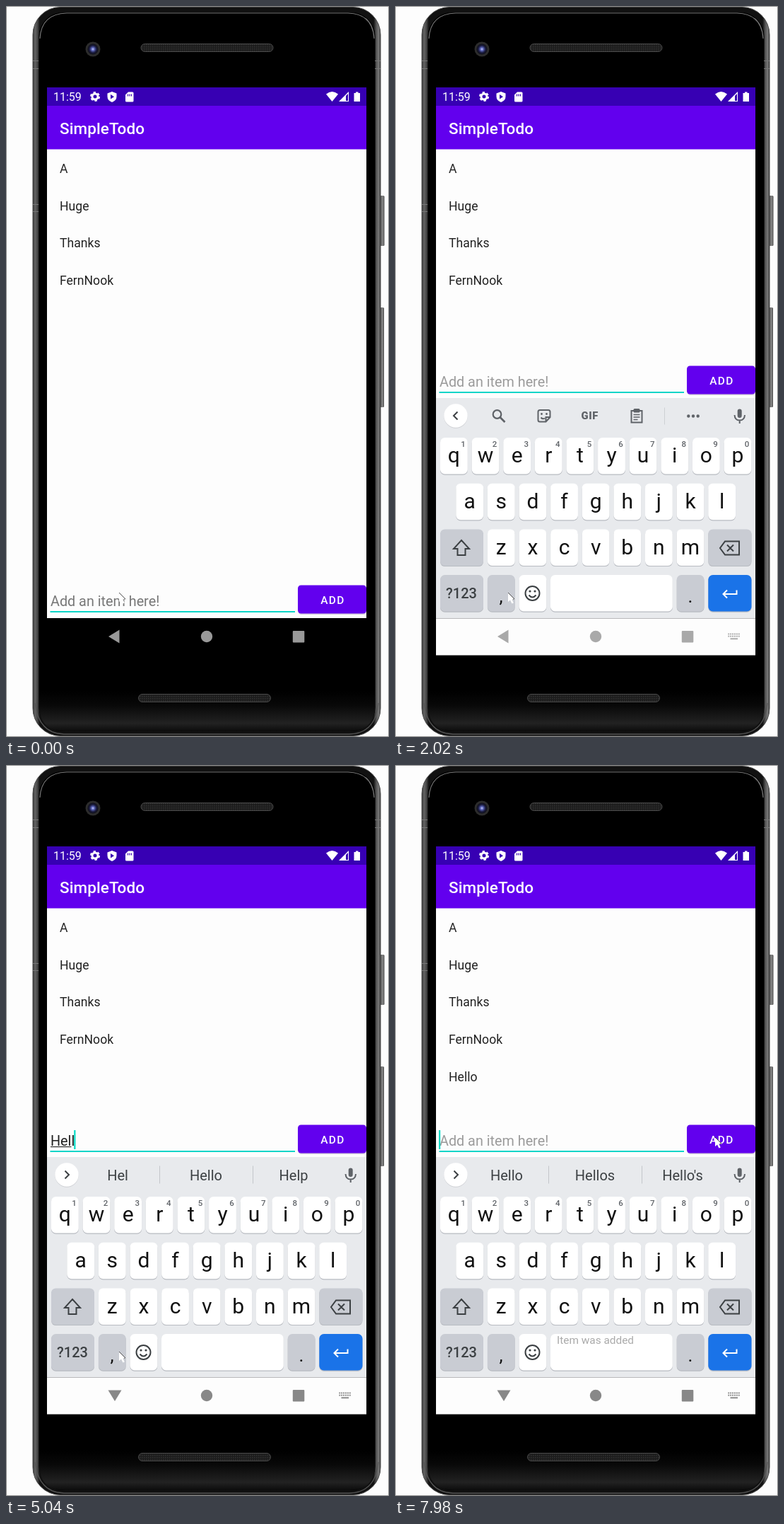
An HTML page that plays this animation: 542 by 1033 pixels, repeating every 8000 ms.

```html
<!DOCTYPE html>
<html lang="en">
<head>
<meta charset="utf-8">
<title>Todo list</title>
<style>
  html, body { margin: 0; width: 100%; height: 100%; overflow: hidden; background: #fdfdfd; }
  svg { display: block; position: absolute; left: 0; top: 0; }
  text { font-family: Roboto, "Open Sans", sans-serif; white-space: pre; }
</style>
</head>
<body>
<svg id="stage" width="542" height="1033" viewBox="0 0 542 1033">
  <defs>
    <linearGradient id="metal">
      <stop offset="0" stop-color="#2a2a2a"/><stop offset=".006" stop-color="#666"/>
      <stop offset=".013" stop-color="#484848"/><stop offset=".02" stop-color="#111"/>
      <stop offset=".98" stop-color="#111"/><stop offset=".988" stop-color="#555"/>
      <stop offset=".995" stop-color="#777"/><stop offset="1" stop-color="#333"/>
    </linearGradient>
    <linearGradient id="side">
      <stop offset="0" stop-color="#444"/><stop offset=".6" stop-color="#8a8a8a"/>
      <stop offset="1" stop-color="#4a4a4a"/>
    </linearGradient>
    <linearGradient id="chin" x2="0" y2="1">
      <stop offset="0" stop-color="#000"/><stop offset=".35" stop-color="#080808"/>
      <stop offset=".8" stop-color="#222"/><stop offset="1" stop-color="#0c0c0c"/>
    </linearGradient>
    <radialGradient id="lens">
      <stop offset="0" stop-color="#c9d0ff"/><stop offset=".3" stop-color="#5a64b8"/>
      <stop offset=".65" stop-color="#1c1d42"/><stop offset="1" stop-color="#0d0d14"/>
    </radialGradient>
    <pattern id="mesh" width="3" height="3" patternUnits="userSpaceOnUse">
      <rect width="3" height="3" fill="#1c1c1c"/><rect width="1.5" height="1.5" fill="#333"/>
    </pattern>
    <clipPath id="screenClip"><rect x="58" y="115" width="452" height="802.5"/></clipPath>
  </defs>

  <rect width="542" height="1033" fill="#fdfdfd"/>
  <rect x=".5" y=".5" width="541" height="1032" fill="none" stroke="#8a8a8a"/>

  <g id="phone">
    <rect x="529" y="268" width="6.500" height="71" rx="1.500" fill="url(#side)"/>
    <rect x="529" y="426" width="6" height="141" rx="1.500" fill="url(#side)"/>
    <rect x="38" y="1.5" width="492" height="1030" rx="39" fill="url(#metal)" stroke="#4a4a4a"/>
    <rect x="46.500" y="9" width="476" height="1016" rx="34" fill="#000"/>
    <path d="M48 46Q50 11 86 10H484Q519 11 521 46" fill="none" stroke="#777" stroke-width="1.2"/>
    <path d="M47 968H522V989Q522 1024 486 1025H83Q47 1024 47 989Z" fill="url(#chin)"/>
    <path d="M41 985Q46 1028 82 1029H486Q523 1028 527 985" fill="none" stroke="#555" stroke-width="1.300"/>
    <path d="M38 77.500h8M38 88.500h8M38 280.500h8M38 290.500h8M522 77.500h8M522 88.500h8" stroke="#777"/>
    <rect x="191" y="53.500" width="187" height="11" rx="5.500" fill="url(#mesh)" stroke="#484848"/>
    <rect x="187.500" y="972.500" width="187" height="11" rx="5.500" fill="url(#mesh)" stroke="#484848"/>
    <circle cx="123" cy="61" r="10.500" fill="#2c2c2c"/>
    <circle cx="123" cy="61" r="7.500" fill="url(#lens)"/>
  </g>

  <g clip-path="url(#screenClip)">
    <rect x="58" y="115" width="452" height="750" fill="#fdfdfd"/>
    <rect x="58" y="115" width="452" height="26.500" fill="#3700b3"/>
    <rect x="58" y="141" width="452" height="61.500" fill="#6200ee"/>
    <rect x="58" y="865" width="452" height="53" fill="#000"/>
    <g id="status"></g>
    <g id="list"></g>
    <g id="form"></g>
    <g id="keys"></g>
    <g id="nav"></g>
    <text id="toast" x="229" y="818" font-size="15.400" fill="#aaa">Item was added</text>
  </g>

  <g id="mouse">
    <path d="M0 0V13L3 10.500L5.500 15.500L7.800 14.500L5.400 9.500H10Z" fill="#fff"/>
    <path d="M0 0L9.300 9.300H5.200L7.600 14.600" fill="none" stroke="#222" stroke-width=".8" stroke-dasharray="13 1.200 1.200"/>
  </g>
</svg>
<script>
const LOOP = 8000;
const $ = id => document.getElementById(id);

function add(parent, tag, attrs, content) {
  const el = document.createElementNS('http://www.w3.org/2000/svg', tag);
  for (const k in attrs) el.setAttribute(k, attrs[k]);
  if (content !== undefined) el.textContent = content;
  parent.appendChild(el);
  return el;
}
const group = parent => add(parent, 'g', {});
const label = (parent, x, y, size, fill, str, more) =>
  add(parent, 'text', { x, y, 'font-size': size, fill, ...more }, str);
const mid = { 'text-anchor': 'middle' };
const midBold = { ...mid, 'font-weight': 500 };
const box = (parent, x, y, width, height, fill, rx = 0) =>
  add(parent, 'rect', { x, y, width, height, fill, rx });
const dot = (parent, cx, cy, r, fill) => add(parent, 'circle', { cx, cy, r, fill });
const shape = (parent, d, fill) => add(parent, 'path', { d, fill });
const line = (parent, d, stroke, width = 2) =>
  add(parent, 'path', { d, stroke, 'stroke-width': width, fill: 'none' });
const show = (el, on) => el.setAttribute('visibility', on ? 'visible' : 'hidden');

// Status bar and title
const status = $('status');
label(status, 67, 134, 16, '#fff', '11:59');
for (const [r, width, dash] of [[4, 3, 'none'], [6, 2, '3.3 2.98']])
  add(status, 'circle', { cx: 126, cy: 128, r, fill: 'none', stroke: '#fff', 'stroke-width': width, 'stroke-dasharray': dash });
shape(status, 'M150 121l6.500 2.500v4.500q0 5.500-6.500 8q-6.500-2.500-6.500-8v-4.500z', '#fff');
shape(status, 'M148 125l5 3.300l-5 3.300z', '#3700b3');
shape(status, 'M173 121.500h6q1.500 0 1.500 1.500v11q0 1.500-1.500 1.500h-8.500q-1.500 0-1.500-1.500v-8.500z', '#fff');
line(status, 'M172.500 124.500v3M175 124.500v3M177.500 124.500v3', '#3700b3', 1.2);
shape(status, 'M453 124.500Q461.500 117.500 470 124.500L461.500 135Z', '#fff');
shape(status, 'M471 135L485 121V135Z', '#fff');
shape(status, 'M481 127l3-3v10h-3z', '#3700b3');
shape(status, 'M492.500 123h2.500v-1.500h3.500v1.500h2.500v12h-8.500z', '#fff');
label(status, 76, 180.5, 22.5, '#fff', 'SimpleTodo', { 'font-weight': 500, 'letter-spacing': .1 });

// List
const items = ['A', 'Huge', 'Thanks', 'FernNook', 'Hello'].map((name, i) =>
  label($('list'), 76, 236 + i * 52.65, 17.6, '#222', name));

// Input row, in its raised place
const form = $('form');
box(form, 58, 508, 452, 46, '#fdfdfd');
const hint = label(form, 63, 537.5, 19.8, '#9b9b9b', 'Add an item here!');
const typed = label(form, 63, 537.5, 19.8, '#222', '');
const mark = box(form, 63, 539, 0, 1.1, '#222');
box(form, 62.5, 545, 346.5, 2, '#0cd5c8');
const caret = box(form, 62, 516, 2.2, 27, '#03dac5');
box(form, 413.5, 510, 96.500, 40, '#d5d0dc', 4.5);
const button = box(form, 413, 508.5, 97, 40, '#6200ee', 4.5);
label(form, 462.4, 534.7, 15.4, '#fff', 'ADD', { ...midBold, 'letter-spacing': 1.37 });

// Keyboard
const keys = $('keys');
const ink = '#5f6368', dark = '#111', grey = '#c9ccd3';
box(keys, 58, 554, 452, 311.5, '#e8eaed');
box(keys, 58, 865.5, 452, 170, '#fdfdfd');
const PITCH = 44.62;
function key(x, y, width, fill = '#fff') {
  box(keys, x, y + 1.2, width, 51.5, '#b8bbc1', 6.5);
  box(keys, x, y, width, 51.5, fill, 6.5);
}
[['qwertyuiop', 64, 610], ['asdfghjkl', 86.3, 674.7], ['zxcvbnm', 130.9, 739.4]].forEach(([row, x0, y], r) =>
  [...row].forEach((ch, i) => {
    const x = x0 + i * PITCH;
    key(x, y, 38.8);
    label(keys, x + 19.4, y + 35.3, 30, dark, ch, mid);
    if (!r) label(keys, x + 32.5, y + 12.8, 11.5, ink, (i + 1) % 10, midBold);
  }));
key(64, 739.4, 61, grey);
key(443.3, 739.4, 61.2, grey);
key(64, 804, 61, grey);
key(130.9, 804, 38.8, grey);
key(175.5, 804, 38.8);
key(220, 804, 172.8);
key(398.7, 804, 38.8, grey);
key(443.3, 804, 61.2, '#1a73e8');
line(keys, 'M94 755L105 767H99.500V776H88.500V767H83Z', '#3c4043');
line(keys, 'M467 756.500H487V775.500H467L460 766ZM470 761.500l9 9m0-9l-9 9', '#3c4043');
label(keys, 94, 837.3, 20, '#3c4043', '?123', midBold);
label(keys, 150, 843, 26, dark, ',', mid);
label(keys, 418, 843, 26, dark, '.', mid);
add(keys, 'circle', { cx: 194.5, cy: 830, r: 10, fill: 'none', stroke: '#3c4043', 'stroke-width': 2 });
dot(keys, 191, 827, 1.6, '#3c4043');
dot(keys, 198, 827, 1.6, '#3c4043');
line(keys, 'M189.500 832.500Q194.500 838.500 199.500 832.500', '#3c4043');
line(keys, 'M483.500 825.500V831H465M470 825.500L464.500 831L470 836.500', '#fff');

// Strip above the keys: tools or suggestions
dot(keys, 86, 580, 16.7, '#cfd1d5');
dot(keys, 86, 579, 16.7, '#fff');
add(keys, 'rect', { x: 484.7, y: 569.5, width: 6, height: 12.5, rx: 3, fill: ink });
line(keys, 'M480.500 578Q481 585.500 487.700 585.500Q494.500 585.500 495 578M487.700 585.500V590', ink);

const tools = group(keys);
line(tools, 'M88.500 573.500L83 579L88.500 584.500', '#3c4043');
add(tools, 'circle', { cx: 144.5, cy: 577, r: 5.8, fill: 'none', stroke: ink, 'stroke-width': 2.2 });
line(tools, 'M148.500 581L155.500 588', ink, 2.6);
line(tools, 'M205 571H217Q219.500 571 219.500 573.500V581L213.500 587.500H205Q202.500 587.500 202.500 585V573.500Q202.500 571 205 571ZM219 581H213.500V587M206.500 581.500Q209 584.500 212 582.500', ink);
dot(tools, 207.5, 576.5, 1.4, ink);
dot(tools, 214.5, 576.5, 1.4, ink);
label(tools, 275.8, 584.3, 14.8, ink, 'GIF', { ...mid, 'font-weight': 800, 'letter-spacing': .6 });
line(tools, 'M334.500 572H349.500V588.500H334.500Z', ink);
box(tools, 337.5, 569, 9, 5.5, ink, 1.5);
line(tools, 'M337.500 577.500h9M337.500 581h9M337.500 584.500h6', ink, 1.5);
line(tools, 'M381.500 567.500V591.500', '#cdd0d4', 1);
for (const x of [415.3, 422, 428.7]) dot(tools, x, 579.5, 2.2, ink);

const hints = group(keys);
line(hints, 'M83.500 573.500L89 579L83.500 584.500', '#3c4043');
line(hints, 'M217.500 566.500V591.500M349.500 566.500V591.500', '#c3c6ca', 1);
const words = [158, 283, 407].map(x => label(hints, x, 587, 20, '#3c4043', '', mid));

// Navigation icons
const nav = $('nav');
const back = add(nav, 'path', { d: 'M145 891L160.500 881.500V900.500Z' });
add(nav, 'circle', { cx: 284, cy: 891, r: 8.2 });
add(nav, 'rect', { x: 405.8, y: 883, width: 16.5, height: 16.5, rx: 1 });
const kbIcon = group(nav);
for (let r = 0; r < 2; r++)
  for (let c = 0; c < 6; c++)
    add(kbIcon, 'rect', { x: 471.3 + c * 2.9, y: 886.5 + r * 3.2, width: 1.9, height: 1.9 });
add(kbIcon, 'rect', { x: 474.5, y: 893.3, width: 10.5, height: 1.9 });

// Each table holds [start in ms, values...]
const CARET = [[0, 0], [120, 1], [910, 0], [1280, 1], [1780, 0], [2160, 1], [2880, 0], [3410, 1],
  [6240, 0], [6660, 1], [7060, 0], [7590, 1]];
const TEXT = [[0, '', 0], [3840, 'H', 0], [4240, 'He', 1], [4360, 'Hel', 2], [5040, 'Hell', 3],
  [5320, 'Hello', 4], [5570, 'Hello', 5], [7740, '', 0]];
const WORDS = [[0, ''], [4360, 'He Hey Head'], [5040, 'Hel Hello Help'], [5320, "Hell Hello He'll"],
  [5570, "Hello Hellos Hello's"]];
const SLIDE = [[0, 400, 0], [1780, 230, .3], [1900, 115.5, .68], [2020, 0, 1]];
const NAV = [[0, '#999', 0], [1780, '#bbb', 0], [1900, '#dcdcdc', 0], [2020, '#a9a9a9', 0],
  [2160, '#979797', -45], [2280, '#888', -90]];
const MOUSE = [[0, 160, 829], [5970, 282, 703], [6120, 366, 621], [6240, 421, 568], [6370, 446, 543],
  [6510, 447, 543], [6660, 451, 537], [6810, 453, 526]];
const PRESS = [[0, '#6200ee'], [7590, '#7a2cf0'], [7740, '#7420f0'], [7860, '#6a10ef'], [7980, '#6200ee']];
const at = (table, t) => table.findLast(row => row[0] <= t);

const advance = str => {
  const widths = { H: .713, e: .53, l: .243, o: .57 };
  return [...str].reduce((sum, ch) => sum + widths[ch] * 19.8, 0);
};

function render(t) {
  const [, str, marked] = at(TEXT, t);
  typed.textContent = str;
  mark.setAttribute('width', advance(str.slice(0, marked)));
  caret.setAttribute('x', 62 + advance(str));
  show(caret, at(CARET, t)[1]);
  show(hint, !str);
  hint.setAttribute('fill', t < 120 ? '#777' : '#9b9b9b');
  form.setAttribute('transform', `translate(0 ${t < 1780 ? 310 : 0})`);
  button.setAttribute('fill', at(PRESS, t)[1]);
  show(items[4], t >= 7740);
  show($('toast'), t >= 7980);

  const [, drop, alpha] = at(SLIDE, t);
  keys.setAttribute('transform', `translate(0 ${drop})`);
  keys.setAttribute('opacity', alpha);
  const list = at(WORDS, t)[1];
  words.forEach((el, i) => { el.textContent = list.split(' ')[i] || ''; });
  tools.setAttribute('display', list ? 'none' : 'inline');
  hints.setAttribute('display', list ? 'inline' : 'none');

  const [, fill, turn] = at(NAV, t);
  nav.setAttribute('fill', fill);
  back.setAttribute('transform', `rotate(${turn} 153.5 890.5)`);
  show(kbIcon, t >= 510);

  const [, mx, my] = at(MOUSE, t);
  $('mouse').setAttribute('transform', `translate(${mx} ${my})`);
}

const start = performance.now();
function tick() {
  render((performance.now() - start) % LOOP);
  requestAnimationFrame(tick);
}
render(0);
tick();
</script>
</body>
</html>
```
